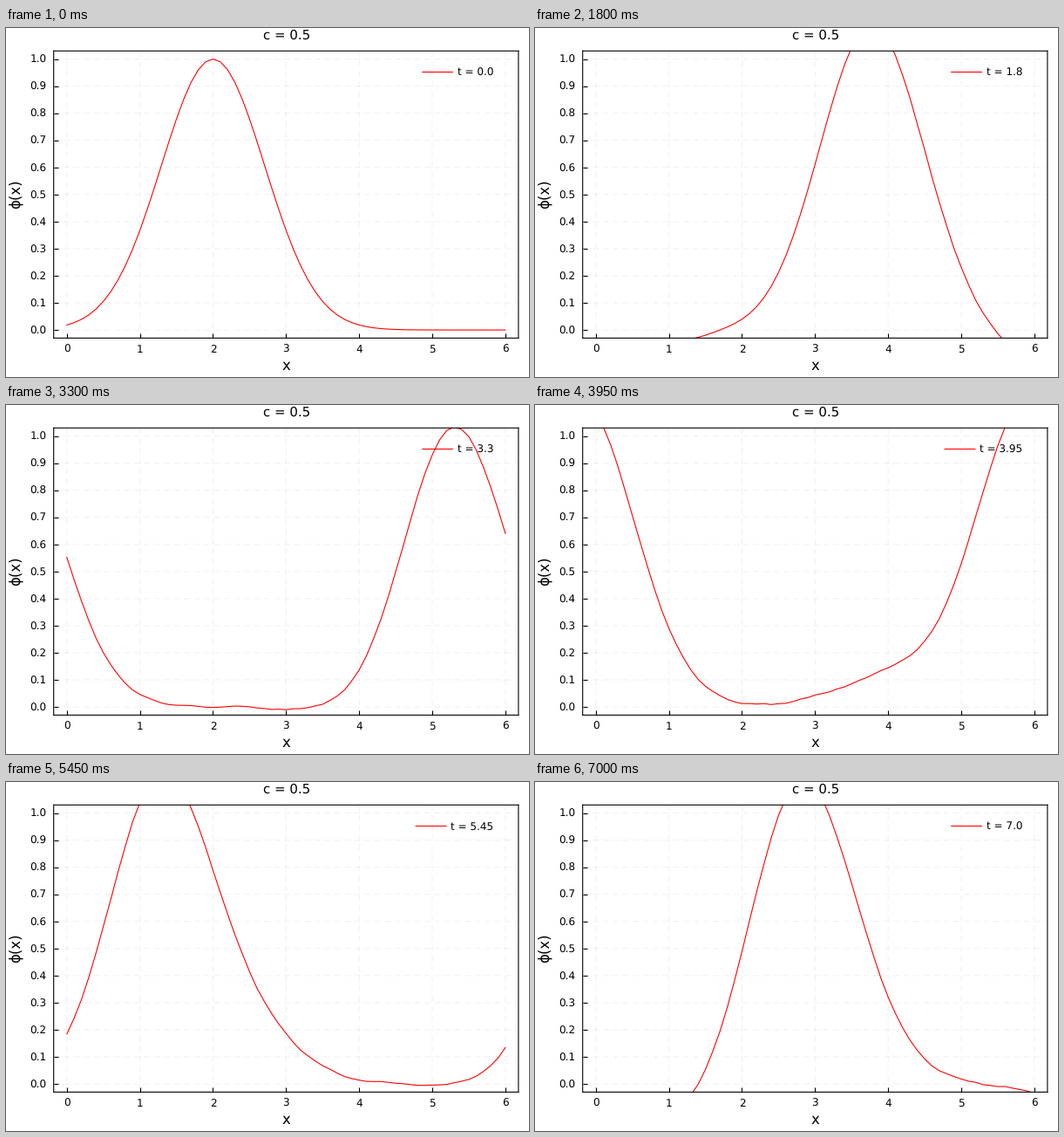
A matplotlib script for the animation above (7050 ms loop, 600 px wide and 400 px high).

```python
import numpy as np
import matplotlib.pyplot as plt
from matplotlib.animation import FuncAnimation

W, H, DPI = 600, 400, 100
PX = 72 / DPI                       # points per pixel
STEPS, C, DX, DT = 141, 0.5, 0.1, 0.05

plt.rcParams.update({
    "font.family": "DejaVu Sans",
    "text.hinting": "none",
    "path.simplify": False,
    "path.snap": False,
})


def leapfrog():
    """Advect a Gaussian round a periodic grid with centred differences."""
    x = DX * np.arange(61)
    u = [np.exp(-(x - 2) ** 2)]
    u.append(u[0] + C / 2 * np.roll(u[0], 1))   # rough starting step
    while len(u) < STEPS:
        slope = np.roll(u[-1], -1) - np.roll(u[-1], 1)
        u.append(u[-2] - C * slope)
    return x, u


x, waves = leapfrog()

fig = plt.figure(figsize=(W / DPI, H / DPI), dpi=DPI, facecolor="white")
left, right, top, bottom = 54.7, 587.9, 26.3, 355.4
ax = fig.add_axes([left / W, 1 - bottom / H,
                   (right - left) / W, (bottom - top) / H])
ax.set_xlim(-0.18, 6.18)
ax.set_ylim(-0.03, 1.03)
ax.set_xticks(range(7))
ax.set_yticks(np.arange(11) / 10, [f"{k / 10:.1f}" for k in range(11)])
ax.set_axisbelow(True)
ax.grid(color="black", alpha=0.06, lw=PX, ls=(0, (7, 4.5)))
ax.tick_params(direction="in", length=5 * PX, width=1.1 * PX,
               labelsize=12 * PX)
ax.tick_params(axis="x", pad=7 * PX)
ax.tick_params(axis="y", pad=8.3 * PX)
for spine in ax.spines.values():
    spine.set_linewidth(1.1 * PX)

# Overlay in pixel coordinates for titles and legend
over = fig.add_axes([0, 0, 1, 1])
over.set_xlim(0, W)
over.set_ylim(H, 0)
over.axis("off")


def label(px, py, text, size, **kw):
    return over.text(px, py, text, fontsize=size * PX, va="baseline",
                     rotation_mode="anchor", **kw)


label(321.8, 13.2, "c = 0.5", 15, ha="center")
label(321.5, 391.8, "x", 16.5, ha="center")
label(16.3, 190, "\u03d5(x)", 16.5, ha="center", rotation=90)

curve, = ax.plot([], [], color="red", lw=1.1 * PX)
key, = over.plot([], [], color="red", lw=1.1 * PX, solid_capstyle="butt")
key_text = label(518, 55.2, "", 12, ha="left")


def draw(n):
    curve.set_data(x, waves[n])
    text = f"t = {round(n * DT, 2)}"
    start = 518 - 7.6 * (len(text) - 7)     # right-aligned legend entry
    key_text.set_text(text)
    key_text.set_x(start)
    key.set_data([start - 40.8, start - 5], [50.5, 50.5])
    return curve, key, key_text


anim = FuncAnimation(fig, draw, frames=STEPS, interval=50, repeat=True,
                     repeat_delay=0, cache_frame_data=False)
plt.show()
```
